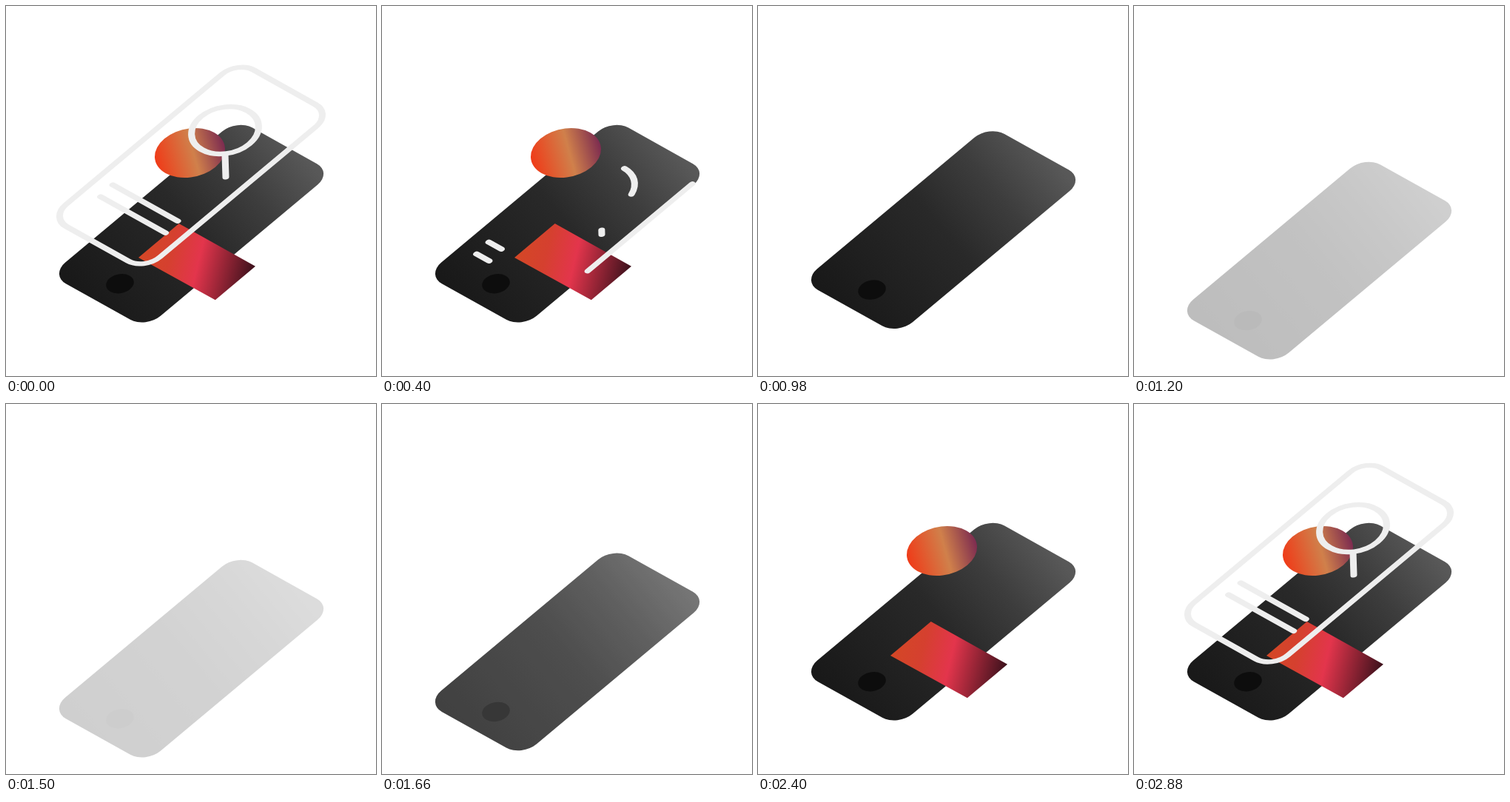
Recreate the animation shown at these times as an HTML page with a canvas. Size 500 px wide and 500 px high, loop 3 s.

```html
<!DOCTYPE html>
<html lang="en">
<head>
<meta charset="utf-8">
<title>Phone layers</title>
<style>
  html, body { margin: 0; width: 100%; height: 100%; overflow: hidden; background: #fff; }
  canvas { display: block; width: 500px; height: 500px; }
</style>
</head>
<body>
<canvas id="stage" width="500" height="500"></canvas>
<script>
const ctx = document.getElementById('stage').getContext('2d');
const LOOP = 3000;

// Slanted plane: the long side runs up right, the short side down right.
const U = [32.8, -27.4], V = [34.4, 19.2];
// Rounded boxes: half length, half width, corner radius.
const BODY = { a: 3.235, b: 1.265, r: 0.61 };
const FRAME = { a: 3.22, b: 1.207, r: 0.639 };
const FRAME_LEN = 4 * (FRAME.a + FRAME.b) + 2 * Math.PI * FRAME.r;
const DROP = 77.5, SINK = 50;

const span = (t, from, to) => Math.min(1, Math.max(0, (t - from) / (to - from)));
const inOut = u => u < 0.5 ? 16 * u ** 5 : 1 - 16 * (1 - u) ** 5;
const inBack = (u, s = 5.75) => (s + 1) * u ** 3 - s * u * u;

// Builds a path in the slanted plane; paint() runs while the plane is active.
function onPlane(x, y, build, paint) {
  ctx.save();
  ctx.transform(...U, ...V, x, y);
  ctx.beginPath();
  build();
  if (paint) paint();
  ctx.restore();
}

const roundBox = ({ a, b, r }) => () => {
  const q = Math.PI / 2;
  ctx.moveTo(a, b + r);
  ctx.lineTo(-a, b + r);
  ctx.arc(-a, b, r, q, 2 * q);
  ctx.arc(-a, -b, r, 2 * q, 3 * q);
  ctx.arc(a, -b, r, 3 * q, 4 * q);
  ctx.arc(a, b, r, 0, q);
  ctx.closePath();
};

const disc = r => () => ctx.arc(0, 0, r, 0, 2 * Math.PI);

const segment = (dx, dy) => () => {
  ctx.moveTo(0, 0);
  ctx.lineTo(dx, dy);
};

function gradient(x0, y0, x1, y1, stops) {
  const g = ctx.createLinearGradient(x0, y0, x1, y1);
  for (const [at, color] of stops) g.addColorStop(at, color);
  return g;
}

const bodyFill = gradient(-135, 112, 135, -112,
  [[0, '#191919'], [0.5, '#292929'], [0.75, '#3d3d3d'], [1, '#585858']]);
const discFill = gradient(-47, 13, 47, -13,
  [[0, '#f03a17'], [0.55, '#d0804b'], [1, '#7b2a50']]);
const cardFill = gradient(-75, -18, 79, 19,
  [[0, '#d44726'], [0.25, '#d5402f'], [0.5, '#e3354c'], [1, '#35101a']]);

function drawPhone(t) {
  const out = t < 1370;
  const move = out ? inOut(span(t, 780, 1280)) : 1 - inOut(span(t, 1456, 1956));
  const alpha = out ? 1 - span(t, 1000, 1281) : span(t, 1448, 1705);
  if (!alpha) return;
  ctx.save();
  ctx.translate(250.5, 294.2 + SINK * move);
  onPlane(0, 0, roundBox(BODY));
  ctx.fillStyle = bodyFill;
  ctx.fill();
  onPlane(-96.5, 81, disc(0.395));
  ctx.fillStyle = '#0d0d0d';
  ctx.fill();
  ctx.restore();
  // A white veil fades the body and its button as one.
  ctx.fillStyle = `rgba(255,255,255,${1 - alpha})`;
  ctx.fillRect(0, 0, 500, 500);
}

function popped(x, y, size, fill, build) {
  ctx.save();
  ctx.translate(x, y);
  ctx.scale(size, size);
  build();
  ctx.fillStyle = fill;
  ctx.fill();
  ctx.restore();
}

function drawShapes(t) {
  const u = t < 1370 ? span(t, 400, 920) : 1 - span(t, 1867, 2406);
  const size = 1 - inBack(u);
  if (size <= 0.001) return;
  popped(258, 345.7, size, cardFill, () => {
    ctx.beginPath();
    ctx.moveTo(-24.3, -51.6);
    ctx.lineTo(79, 6);
    ctx.lineTo(24.8, 51.6);
    ctx.lineTo(-79, -5.7);
    ctx.closePath();
  });
  popped(248.5, 198.5, size, discFill, () => onPlane(0, 0, disc(1)));
}

function drawLines(t) {
  const rise = inOut(span(t, 2444, 2944));
  const out = t < 1370;
  const part = out ? 1 - span(t, 0, 500) : rise;
  const drop = DROP * (out ? inOut(span(t, 0, 460)) : 1 - rise);
  if (part <= 0) return;

  const trace = (x, y, len, build) => onPlane(x, y + drop, build, () => {
    ctx.setLineDash(part < 0.9995 ? [Math.max(len * part, 1e-4), len * 2] : []);
    ctx.stroke();
  });

  ctx.save();
  ctx.strokeStyle = '#eee';
  ctx.lineWidth = 0.19;
  ctx.lineCap = ctx.lineJoin = 'round';
  trace(250, 215.6, FRAME_LEN, roundBox(FRAME));
  trace(296, 168, 2 * Math.PI * 0.955, disc(0.955));
  trace(297, 231.3, 0.94, segment(0.666, -0.664));
  trace(144, 241.5, 2.57, segment(0, 2.57));
  trace(127.5, 257.5, 2.57, segment(0, 2.57));
  ctx.restore();
}

function render(t) {
  ctx.fillStyle = '#fff';
  ctx.fillRect(0, 0, 500, 500);
  drawPhone(t);
  drawShapes(t);
  drawLines(t);
}

const start = performance.now();
function tick() {
  render((performance.now() - start) % LOOP);
  requestAnimationFrame(tick);
}
tick();
</script>
</body>
</html>
```
